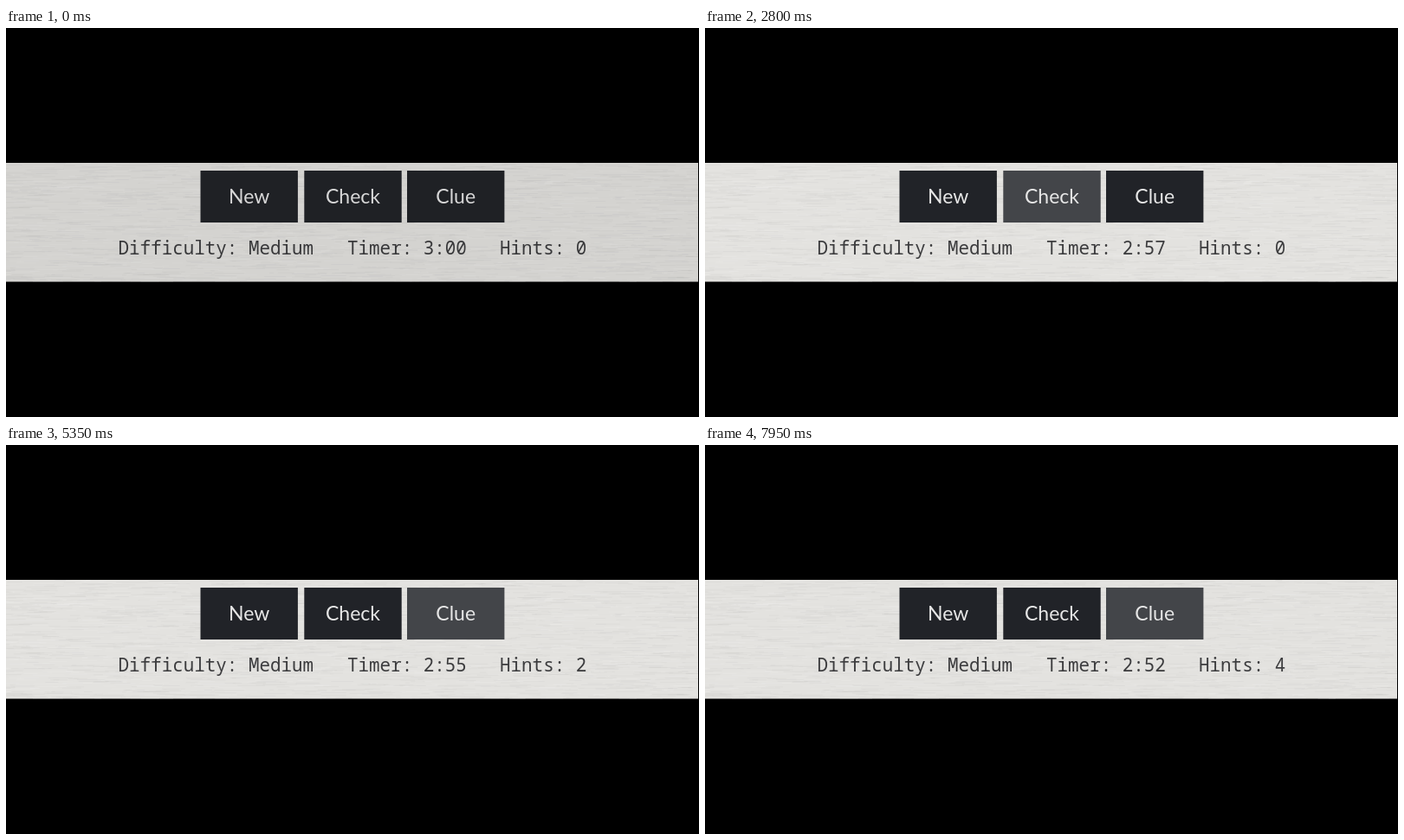
Animation, 800 px wide and 450 px high, one loop 8000 ms. Source, as an HTML page with a canvas:

```html
<!DOCTYPE html>
<html lang="en">
<head>
<meta charset="utf-8">
<title>Puzzle controls</title>
<style>
  html, body { margin: 0; height: 100%; overflow: hidden; background: #000; }
  canvas { display: block; }
</style>
</head>
<body>
<canvas id="stage" width="800" height="450"></canvas>
<script>
const LOOP = 8000;
const FADE = 250;
const BAND = { x: 0, y: 156, w: 799, h: 137.5 };
const TICKS = [700, 1650, 2700, 3750, 4700, 5700, 6650, 7650];
const HINTS = [3300, 5000, 6500, 7800];

// Each hover span is [pointer enters, pointer leaves].
const BUTTONS = [
  { label: 'New', x: 224.5, hovers: [] },
  { label: 'Check', x: 344.3, hovers: [[2390, 4110], [5590, 6900]] },
  { label: 'Clue', x: 463, hovers: [[4150, 5550], [6970, 9000]] }
];

const ctx = document.getElementById('stage').getContext('2d');
const clamp = v => Math.min(1, Math.max(0, v));
const easeOut = v => 1 - (1 - clamp(v)) ** 2;
const mix = (a, b, k) => `rgb(${a.map((v, i) => Math.round(v + (b[i] - v) * k))})`;
const countPast = (times, t) => times.filter(at => t >= at).length;

function makePaper() {
  const paper = document.createElement('canvas');
  paper.width = BAND.w;
  paper.height = Math.ceil(BAND.h);
  const p = paper.getContext('2d');
  let seed = 11;
  const random = () => (seed = seed * 16807 % 2147483647) / 2147483647;
  for (let i = 0; i < 2600; i++) {
    const light = random() < 0.5;
    p.fillStyle = light ? 'rgba(255,255,255,.1)' : 'rgba(90,88,82,.035)';
    p.fillRect(random() * 830 - 30, random() * 138, 4 + random() * 36, 1);
  }
  return paper;
}
const paper = makePaper();

function text(str, x, y, font, color, align) {
  ctx.font = font;
  ctx.fillStyle = color;
  ctx.textAlign = align;
  ctx.fillText(str, x, y);
}

function drawButton({ label, x, hovers }, t) {
  const hover = hovers.reduce((sum, [enter, leave]) =>
    sum + easeOut((t - enter) / FADE) - easeOut((t - leave) / FADE), 0);
  ctx.fillStyle = mix([33, 35, 40], [67, 69, 73], hover);
  ctx.fillRect(x, 165, 112.4, 60);
  text(label, x + 56.2, 203, '23px Lato, sans-serif', '#e6e6e6', 'center');
}

function draw(t) {
  const { x, y, w, h } = BAND;
  ctx.fillStyle = '#000';
  ctx.fillRect(0, 0, 800, 450);
  ctx.fillStyle = '#e3e2df';
  ctx.fillRect(x, y, w, h);
  ctx.drawImage(paper, 0, 0, w, h, x, y, w, h);

  BUTTONS.forEach(button => drawButton(button, t));

  const left = 180 - countPast(TICKS, t);
  const clock = `${Math.floor(left / 60)}:${String(left % 60).padStart(2, '0')}`;
  const info = (str, at) =>
    text(str, at, 261.5, '20.9px "Noto Sans Mono", monospace', '#3c3c3e', 'left');
  info('Difficulty: Medium', 129.5);
  info(`Timer: ${clock}`, 394);
  info(`Hints: ${countPast(HINTS, t)}`, 570);

  // The picture opens slightly dim.
  ctx.fillStyle = `rgba(0,0,0,${0.065 * (1 - clamp((t - 30) / 250))})`;
  ctx.fillRect(x, y, w, h);
}

const start = performance.now();
function frame() {
  draw((performance.now() - start) % LOOP);
  requestAnimationFrame(frame);
}
frame();
</script>
</body>
</html>
```
